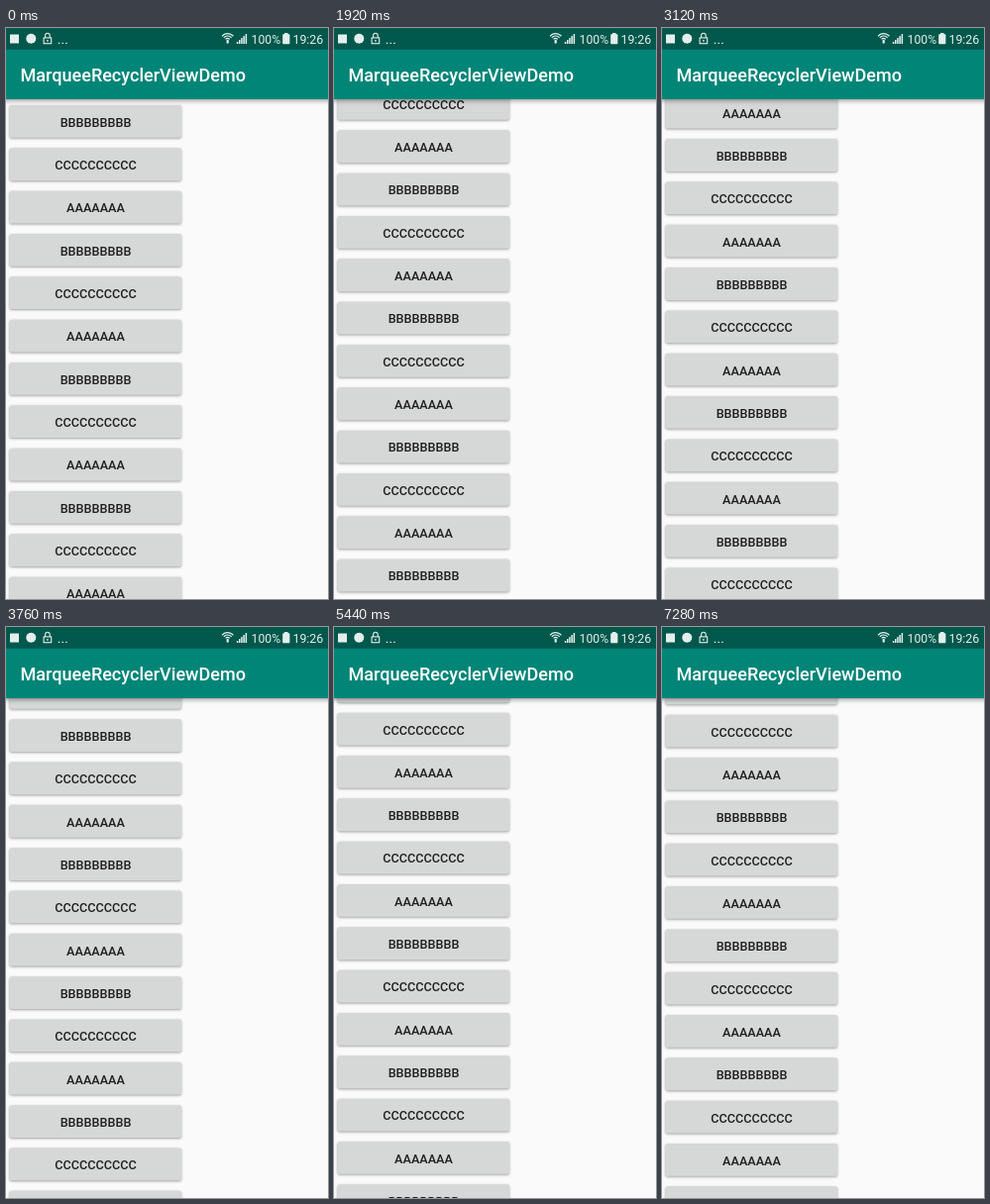
An HTML page with a canvas that plays this animation: 325x577 px, repeating every 7360 ms.

```html
<!DOCTYPE html>
<html lang="en">
<head>
<meta charset="utf-8">
<title>Marquee list</title>
<style>
  html, body { margin: 0; width: 100%; height: 100%; overflow: hidden; background: #fafafa; }
  canvas { display: block; width: 325px; height: 577px; }
</style>
</head>
<body>
<canvas id="stage"></canvas>
<script>
const W = 325, H = 577, LOOP = 7360, STEP = 80;
const PITCH = 43.33, BAR_BOTTOM = 72, STATUS_BOTTOM = 21.7;
const LABELS = ['BBBBBBBBB', 'CCCCCCCCCC', 'AAAAAAA'];

// Scroll distance over time; the list starts again at 6240 ms.
const SCROLL = [
  [0, 0], [960, 34.2], [1920, 61.3], [3120, 95.9], [4480, 136.1], [6160, 186],
  [6240, 0.6], [6320, 3], [7280, 32.6]
];

const canvas = document.getElementById('stage');
const ctx = canvas.getContext('2d');
const dpr = window.devicePixelRatio || 1;
canvas.width = Math.round(W * dpr);
canvas.height = Math.round(H * dpr);

function scrollAt(t) {
  const i = SCROLL.findIndex(([time]) => time >= t);
  if (i <= 0) return i ? SCROLL[SCROLL.length - 1][1] : 0;
  const [t0, y0] = SCROLL[i - 1], [t1, y1] = SCROLL[i];
  return y0 + (y1 - y0) * (t - t0) / (t1 - t0);
}

function text(str, x, y, font, color, align = 'left') {
  ctx.font = font + ' Roboto, sans-serif';
  ctx.fillStyle = color;
  ctx.textAlign = align;
  ctx.fillText(str, x, y);
}

function box(x, y, w, h, color, r = 0) {
  ctx.fillStyle = color;
  ctx.beginPath();
  ctx.roundRect(x, y, w, h, r);
  ctx.fill();
}

function arc(x, y, r, from, to) {
  ctx.beginPath();
  ctx.arc(x, y, r, from, to);
  ctx.stroke();
}

function button(label, y) {
  ctx.save();
  ctx.shadowColor = 'rgba(0,0,0,.36)';
  ctx.shadowBlur = 2.6 * dpr;
  ctx.shadowOffsetY = dpr;
  box(3.6, y, 173.4, 32.8, '#d6d7d7', 1.8);
  ctx.restore();
  text(label, 90.5, y + 21.8, '500 12.64px', '#202020', 'center');
}

function drawList(offset) {
  const first = Math.max(0, Math.floor(offset / PITCH) - 1);
  for (let k = first; k < first + 15; k++) {
    button(LABELS[k % 3], 78 + k * PITCH - offset);
  }
}

function drawToolbar() {
  ctx.save();
  ctx.shadowColor = 'rgba(0,0,0,.4)';
  ctx.shadowBlur = 5 * dpr;
  ctx.shadowOffsetY = 1.5 * dpr;
  box(-10, 0, W + 20, BAR_BOTTOM, '#008577');
  ctx.restore();
  box(0, 0, W, STATUS_BOTTOM, '#00574b');
  text('MarqueeRecyclerViewDemo', 14.5, 53.8, '500 18.06px', '#fff');
}

function drawStatus() {
  const ink = '#e4efed';
  ctx.strokeStyle = ink;

  // Notifications
  box(4, 6.5, 9, 9, ink);
  box(20.3, 5.8, 10, 10, ink, 5);
  ctx.lineWidth = 1.1;
  ctx.strokeRect(38.1, 9.9, 7.6, 5.8);
  box(41.2, 12, 1.4, 1.8, ink);
  ctx.beginPath();
  ctx.moveTo(39.6, 9.8);
  ctx.lineTo(39.6, 7.6);
  ctx.arc(41.9, 7.6, 2.3, Math.PI, 0);
  ctx.lineTo(44.2, 9.8);
  ctx.stroke();
  for (let i = 0; i < 3; i++) box(52.8 + i * 3.7, 14.7, 1.4, 1.4, ink);

  // Wireless
  ctx.lineWidth = 1.2;
  for (const r of [2.6, 5, 7.4]) arc(223.7, 13, r, -Math.PI * .78, -Math.PI * .22);
  box(222.6, 11.8, 2.2, 4, ink, 1);

  // Signal
  for (let i = 0; i < 5; i++) {
    const h = 2 + i * 2;
    box(232.8 + i * 2.2, 16 - h, 1.5, h, ink);
  }

  text('100%', 247.6, 16, '400 12.2px', ink);
  box(281, 5, 3.6, 2, ink);
  box(279.2, 6.3, 7.2, 10, ink, .8);
  text('19:26', 320.3, 16, '400 12.4px', ink, 'right');
}

function draw(now) {
  const t = Math.floor((now % LOOP) / STEP) * STEP;
  ctx.setTransform(dpr, 0, 0, dpr, 0, 0);
  box(0, 0, W, H, '#fafafa');
  drawList(scrollAt(t));
  drawToolbar();
  drawStatus();
}

const start = performance.now();
function tick() {
  draw(performance.now() - start);
  requestAnimationFrame(tick);
}
tick();
</script>
</body>
</html>
```
